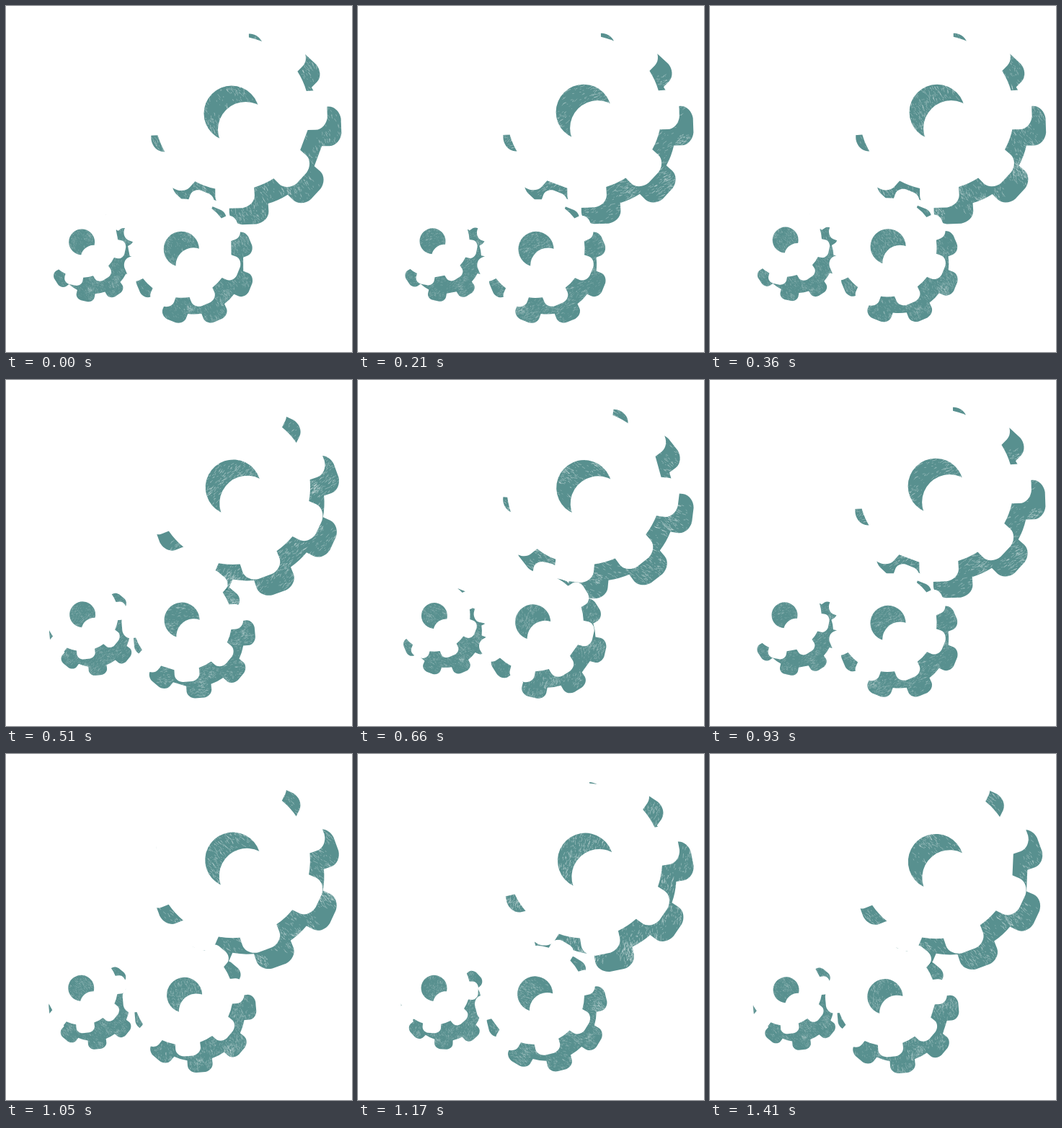
Animation, 480 px wide and 480 px high, one loop 1.44 s. Source, as an HTML page:

```html
<!DOCTYPE html>
<html lang="en">
<head>
<meta charset="utf-8">
<title>Gears</title>
<style>
  html, body { margin: 0; width: 100%; height: 100%; overflow: hidden; background: #fff; }
  svg { display: block; width: 100vw; height: 100vh; }
</style>
</head>
<body>
<svg id="stage" viewBox="0 0 480 480"></svg>
<script>
const NS = 'http://www.w3.org/2000/svg';
const stage = document.getElementById('stage');

// x, y: pivot; dx, dy: shadow offset; angle: first tooth; ex, ey: hole eccentricity
const gears = [
  { x: 314, y: 148.2, dx: 19.5, dy: 22.3, size: 1, angle: 43, dir: 1, ex: -1.05, ey: 0.9 },
  { x: 104.9, y: 326, dx: 16.4, dy: 22.4, size: 0.467, angle: 12, dir: 1, ex: 0.25, ey: 1.4 },
  { x: 245.2, y: 335.5, dx: 16.7, dy: 22.6, size: 0.638, angle: 22, dir: -1, ex: -1.9, ey: 1.8 }
];
const TEETH = 8;
const HOLE = 38.5, BODY = 107.6;
const SLOT = 30, SLOTS = 48;

function add(parent, tag, attrs) {
  const el = document.createElementNS(NS, tag);
  for (const key in attrs) el.setAttribute(key, attrs[key]);
  parent.appendChild(el);
  return el;
}

// Small seeded generator for the chalk grain
let seed = 7;
function rand() {
  seed = (seed * 16807) % 2147483647;
  return seed / 2147483647;
}

function gearPath({ size, angle, ex, ey }) {
  const body = BODY * size, foot = Math.sqrt(BODY * BODY - 27 * 27);
  let d = '';
  for (let i = 0; i < TEETH; i++) {
    const a = (angle + i * 360 / TEETH) * Math.PI / 180;
    const c = Math.cos(a), s = Math.sin(a);
    // u runs along the tooth, v across it
    const p = (u, v) =>
      ((u * c - v * s) * size + ex * 0.4).toFixed(2) + ' ' +
      ((u * s + v * c) * size + ey * 0.4).toFixed(2) + ' ';
    d += (i ? `A${body} ${body} 0 0 1 ` : 'M') + p(foot, -27) + 'L' + p(115, -27.3) +
      'C' + p(124, -27.3) + p(131, -19) + p(132, -10) +
      'L' + p(132, 10) +
      'C' + p(131, 19) + p(124, 27.3) + p(115, 27.3) + 'L' + p(foot, 27);
  }
  const r = HOLE * size;
  return d + `ZM${ex - r} ${ey}a${r} ${r} 0 1 0 ${2 * r} 0a${r} ${r} 0 1 0 ${-2 * r} 0Z`;
}

function spot(radius) {
  const r = radius * Math.sqrt(rand()), a = rand() * Math.PI * 2;
  return [r * Math.cos(a), r * Math.sin(a)];
}

// Short strokes, most of them gathered in loose patches
function grainPath(patches, strokes) {
  let d = '';
  for (let i = 0; i < patches; i++) {
    const [px, py] = spot(136), spread = 8 + rand() * 26;
    for (let j = 0; j < strokes; j++) {
      const [x, y] = spot(spread);
      const dir = 1.13 + (rand() - 0.5) * 0.8, len = 1 + rand() * rand() * 8;
      d += `M${(px + x).toFixed(1)} ${(py + y).toFixed(1)}` +
        `l${(len * Math.cos(dir)).toFixed(1)} ${(len * Math.sin(dir)).toFixed(1)}`;
    }
  }
  return d;
}

const defs = add(stage, 'defs', {});
const shadows = add(stage, 'g', {});
const fronts = add(stage, 'g', {});
add(defs, 'path', { id: 'grain', d: grainPath(110, 36), fill: 'none', stroke: '#fff' });

gears.forEach((gear, i) => {
  const d = gearPath(gear);
  const clip = add(defs, 'clipPath', { id: 'clip' + i });
  add(clip, 'path', { d, 'clip-rule': 'evenodd' });

  gear.shadow = add(shadows, 'g', {});
  add(gear.shadow, 'path', { d, fill: 'rgb(51,119,118)', 'fill-opacity': 0.816, 'fill-rule': 'evenodd' });
  const grain = add(gear.shadow, 'g', { 'clip-path': `url(#clip${i})` });
  add(grain, 'use', {
    href: '#grain', transform: `scale(${gear.size})`,
    'stroke-width': 0.9, 'stroke-opacity': 0.3
  });

  gear.front = add(fronts, 'path', { d, fill: '#fff', 'fill-rule': 'evenodd' });
});

let shown = -1;
function draw(ms) {
  const slot = Math.floor(ms / SLOT) % SLOTS;
  // Five poses are spread over every six slots
  const pose = Math.floor(slot * 5 / 6);
  if (pose === shown) return;
  shown = pose;
  for (const g of gears) {
    const turn = `rotate(${g.dir * 18 * pose})`;
    g.shadow.setAttribute('transform', `translate(${g.x + g.dx} ${g.y + g.dy}) ${turn}`);
    g.front.setAttribute('transform', `translate(${g.x} ${g.y}) ${turn}`);
  }
}

const start = performance.now();
function tick() {
  draw(performance.now() - start);
  requestAnimationFrame(tick);
}
tick();
</script>
</body>
</html>
```
